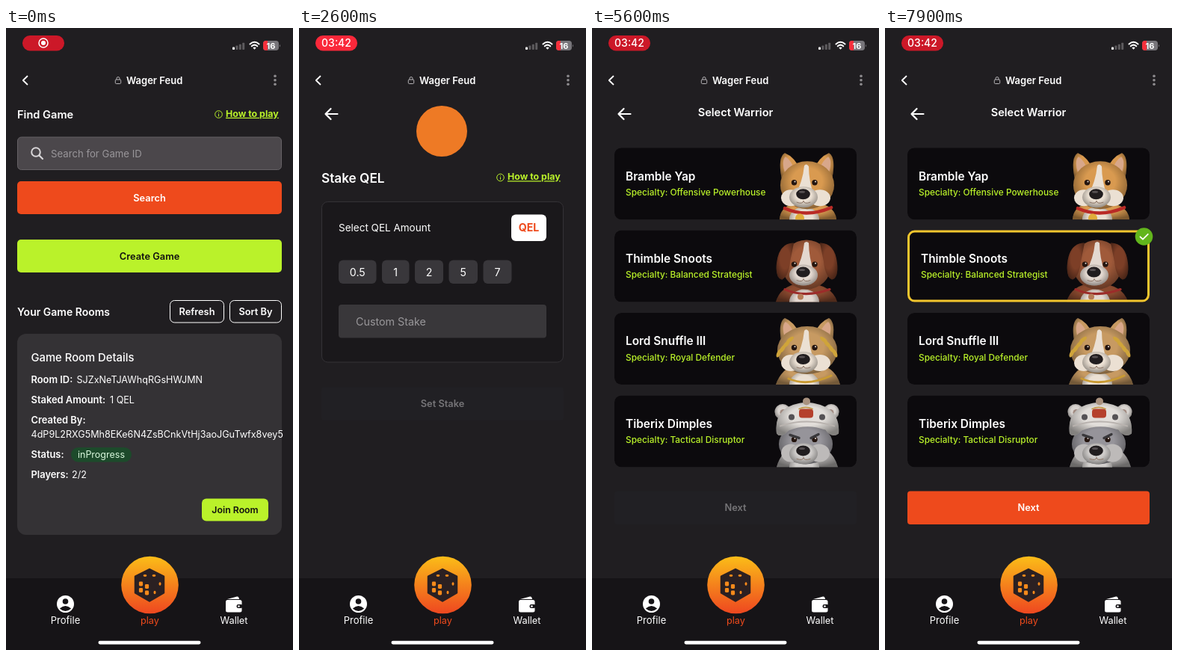
An HTML page that plays this animation: 384x832 px, repeating every 8 s.

```html
<!DOCTYPE html>
<html lang="en">
<head>
<meta charset="utf-8">
<title>Game rooms</title>
<style>
  html, body { margin: 0; width: 100%; height: 100%; overflow: hidden; background: #201e21; }
  svg { display: block; width: 100%; height: 100%; font-family: Inter, Roboto, sans-serif; }
</style>
</head>
<body>
<svg id="stage" viewBox="0 0 384 832"></svg>
<script>
const LOOP = 8000;
const WHITE = '#fff', LIME = '#baf22a', ORANGE = '#ee4a1c', BG = '#201e21';

// Times in ms
const PRESS = 1650, TIMER_IN = 1650, OPEN_STAKE = 2000, PICK_AMOUNT = 3400,
      OPEN_WARRIORS = 4500, IMAGES_READY = 5100, PICK_WARRIOR = 7200, FADE = 250,
      PULSE = 2000, PULSE_PEAK = 2600;

// Markup helpers
const rect = (x, y, w, h, r, fill, extra = '') =>
  `<rect x="${x}" y="${y}" width="${w}" height="${h}" rx="${r}" fill="${fill}" ${extra}/>`;
const circle = (x, y, r, fill, extra = '') =>
  `<circle cx="${x}" cy="${y}" r="${r}" fill="${fill}" ${extra}/>`;
const oval = (x, y, rx, ry, fill, extra = '') =>
  `<ellipse cx="${x}" cy="${y}" rx="${rx}" ry="${ry}" fill="${fill}" ${extra}/>`;
const shape = (d, fill, extra = '') => `<path d="${d}" fill="${fill}" ${extra}/>`;
const line = (d, stroke, width, extra = '') =>
  `<path d="${d}" fill="none" stroke="${stroke}" stroke-width="${width}" stroke-linecap="round" stroke-linejoin="round" ${extra}/>`;
const text = (x, y, size, weight, fill, str, extra = '') =>
  `<text x="${x}" y="${y}" font-size="${size}" font-weight="${weight}" fill="${fill}" ${extra}>${str}</text>`;
const label = (x, y, size, weight, fill, str, extra = '') =>
  text(x, y, size, weight, fill, str, `text-anchor="middle" ${extra}`);
const group = (id, body, extra = '') => `<g id="${id}" ${extra}>${body}</g>`;

const backArrow = line('M51.5 115H35.5M42.5 108L35.5 115L42.5 122', WHITE, 2.2);

const howToPlay = (x, y) =>
  circle(x + 5.5, y - 3.3, 4.8, 'none', `stroke="${LIME}"`) +
  line(`M${x + 5.5} ${y - 3.5}v2.6M${x + 5.5} ${y - 5.6}v.1`, LIME, 1) +
  text(x + 15, y, 12.4, 700, LIME, 'How to play', 'text-decoration="underline"');

function statusBar() {
  const bars = [0, 1, 2, 3].map(i =>
    rect(303 + i * 4.4, 25.5 - i * 1.9, 3, 3.5 + i * 1.9, 0.8, i ? '#5d5b5e' : WHITE)).join('');
  const wifi = line('M326.5 21.5Q332.5 16 338.5 21.5M328.8 24.3Q332.5 21 336.2 24.3', WHITE, 2.1) +
    shape('M330.3 26.4Q332.5 24.8 334.7 26.4L332.5 28.8Z', WHITE);
  const battery = rect(344, 17, 21, 13, 4, '#77757a') +
    shape('M348 17H350V30H348Q344 30 344 26V21Q344 17 348 17Z', '#f5303c') +
    shape('M366 21.5q1.8 2 0 4z', '#77757a') + label(354.5, 27.6, 11, 700, WHITE, '16');
  const record = group('record',
    circle(50, 20, 6, 'none', `stroke="${WHITE}" stroke-width="1.5"`) + circle(50, 20, 3, WHITE));
  return rect(22, 10, 56, 20.5, 10, '#cc1427', 'id="pill"') + record +
    group('timer', label(50, 25.2, 14, 500, WHITE, '03:42')) + bars + wifi + battery;
}

const header = line('M28.5 64.5L22.8 70L28.5 75.5', WHITE, 1.8) +
  rect(146.3, 69, 7.4, 5.5, 1.2, 'none', 'stroke="#b5b3b6"') +
  line('M148 69V67.5a2 2 0 0 1 4 0V69', '#b5b3b6', 1) +
  text(161, 74.6, 13, 600, WHITE, 'Wager Feud') +
  [64.3, 69.8, 75.3].map(y => circle(360, y, 1.8, '#8e8c8f')).join('');

function navBar() {
  const ink = '#2b2022', glow = '#f78a1b';
  const pips = [[180.5, 743.5], [188.5, 747], [180.5, 752], [188.5, 755.5]]
    .map(([x, y]) => rect(x - 2.6, y - 2.9, 5.2, 5.8, 1.4, glow)).join('');
  const dice = shape('M192 724L211 733.5V755.5L192 766.5L173 755.5V733.5Z', ink,
      `stroke="${ink}" stroke-width="2.5" stroke-linejoin="round"`) + pips +
    oval(186, 732.5, 2.4, 1.4, glow) + oval(198, 732.5, 2.4, 1.4, glow) +
    oval(199, 755, 1.5, 2.2, glow) + oval(206, 743.5, 1.5, 2.2, glow);
  const profile = circle(79.5, 770.5, 11.5, WHITE) + circle(79.5, 767, 3.8, '#161417') +
    shape('M71.8 776.5Q79.5 769.5 87.2 776.5Q79.5 783.5 71.8 776.5Z', '#161417');
  const wallet = shape('M296 764L309 760.5Q311.5 760 312 764Z', WHITE) +
    rect(294, 765, 21.5, 16.5, 2.5, WHITE) + rect(308.5, 771, 8, 5, 2.3, '#161417') +
    circle(311.5, 773.5, 1.3, WHITE);
  return rect(0, 736, 384, 96, 0, '#161417') + circle(192.5, 745, 38.3, 'url(#sun)') + dice +
    profile + wallet + label(79.5, 797, 13, 400, WHITE, 'Profile') +
    label(192.5, 797, 12.7, 400, ORANGE, 'play') +
    label(305, 797, 12.8, 400, WHITE, 'Wallet') + rect(123.5, 819.8, 137, 4.6, 2.3, WHITE);
}

function homeScreen() {
  const outlined = (x, w, str) =>
    rect(x + .5, 364.5, w - 1, 29.5, 6, 'none', `stroke="${WHITE}"`) +
    label(x + w / 2, 384, 12.8, 600, WHITE, str);
  const field = (y, name, x = 0, value = '') =>
    text(33.5, y, 12.9, 600, WHITE, name) + (x ? text(x, y, 12.6, 400, WHITE, value) : '');
  return text(15, 121, 14.6, 600, WHITE, 'Find Game') + howToPlay(279, 118.8) +
    rect(15.5, 146, 353, 43.5, 5, '#4b474b', 'stroke="#656165"') +
    circle(40, 166, 5.8, 'none', 'stroke="#d8d6d8" stroke-width="2"') +
    line('M44.5 170.5L49 175', '#d8d6d8', 2.2) +
    text(60, 173, 13.2, 400, '#99969a', 'Search for Game ID') +
    rect(15, 205, 354, 44, 5, ORANGE) + label(192, 231.6, 12.8, 600, WHITE, 'Search') +
    rect(15, 283, 354, 44, 5, LIME, 'id="create"') +
    label(192, 309.7, 12.8, 600, '#111', 'Create Game') +
    text(15, 385, 14, 600, WHITE, 'Your Game Rooms') +
    outlined(219, 73, 'Refresh') + outlined(299, 70, 'Sort By') +
    rect(15, 409, 354, 269, 12, '#343235') +
    text(33.5, 446, 14.8, 500, WHITE, 'Game Room Details') +
    field(475, 'Room ID:', 94.5, 'SJZxNeTJAWhqRGsHWJMN') +
    field(501.8, 'Staked Amount:', 139, '1 QEL') +
    field(528.6, 'Created By:') +
    text(33.5, 548.2, 12.6, 400, WHITE, '4dP9L2RXG5Mh8EKe6N4ZsBCnkVtHj3aoJGuTwfx8vey5') +
    field(575.2, 'Status:') + rect(87, 561, 81, 19.5, 9.7, '#1d4a2b') +
    label(127.5, 575.2, 12.5, 400, '#d8f7dc', 'inProgress') +
    field(602, 'Players:', 88, '2/2') +
    rect(262, 629.5, 89, 30, 6, LIME) + label(306.5, 649.2, 12.3, 600, '#111', 'Join Room');
}

// A button that fades from a dim state to orange
const fadingButton = (id, y, str) =>
  rect(30, y, 324, 44.5, 4, '#212024') + rect(30, y, 324, 44.5, 4, ORANGE, `id="${id}Fill"`) +
  label(192, y + 26.8, 12.8, 600, WHITE, str, `id="${id}Text"`);

function stakeScreen() {
  const chips = [[53, 50.5, '0.5'], [111, 36.5, '1'], [155, 38, '2'], [200.5, 38.5, '5'], [246.5, 38, '7']];
  return backArrow + circle(191, 138, 34, '#ee7a25') +
    text(30, 207, 17.2, 600, WHITE, 'Stake QEL') + howToPlay(264, 203.3) +
    rect(30.5, 232.5, 323, 214.5, 8, '#1a181b', 'stroke="#343236"') +
    text(53, 272, 13.5, 400, WHITE, 'Select QEL Amount') +
    rect(284, 249.5, 47, 35.5, 6, WHITE) + label(307.5, 272.3, 14.2, 700, ORANGE, 'QEL') +
    chips.map(([x, w, str], i) =>
      rect(x, 310.5, w, 31.5, 6, '#39373b', `id="chip${i}"`) +
      label(x + w / 2, 331.8, 14.2, 400, WHITE, str, `id="chipText${i}"`)).join('') +
    rect(53, 370, 278, 44.5, 4, '#39373a') +
    text(76, 397.8, 14.3, 400, '#99979a', 'Custom Stake', 'id="amount"') +
    fadingButton('set', 480.3, 'Set Stake');
}

// Portraits live in a 94 x 96 box
const shaded = (draw, fill) => draw(fill) + draw('url(#shade)');
const mirrored = body => body + `<g transform="translate(${2 * 45.5} 0) scale(-1 1)">${body}</g>`;
const torso = (d, fur, chest) => shaded(fill => shape(d, fill), fur) +
  shaded(fill => oval(42, 96, 20, 17, fill), chest);

const face = (eyeY, noseY, muzzle) =>
  shaded(fill => oval(41, noseY + 4, 19, 14, fill), muzzle) +
  [28.5, 56].map(x => circle(x, eyeY, 3.7, '#24150f') + circle(x + 1, eyeY - 1.3, 1, '#e8dfd8')).join('') +
  oval(40.5, noseY, 9.3, 7, '#211d1f') + oval(39, noseY - 3, 4, 1.5, '#565052') +
  line(`M32 ${noseY + 11}Q40 ${noseY + 14} 41 ${noseY + 9}Q42 ${noseY + 14} 50 ${noseY + 11}`, '#8d7566', 1);

function corgi(fur, regal) {
  const ears = shaded(fill => shape('M12 42Q6 13 16 7Q29 12 37 30Z', fill), fur) +
    shape('M16 33Q11 17 17 12Q25 17 29 30Z', '#d8a78a');
  const cream = '#ebe0d3';
  const leaves = [0, 1, 2, 3].map(i => {
    const x = 8 + i * 5, y = 54 - i * 6;
    return oval(x, y, 2.6, 6, '#cfa43a', `transform="rotate(${25 + i * 9} ${x} ${y})"`);
  }).join('');
  const trim = regal
    ? mirrored(leaves) + line('M21 88Q46 99 78 84', '#c99b33', 3)
    : line('M16 81Q45 94 78 80', '#b92a26', 4.5) + circle(36, 94, 6, '#e0ad3a');
  return mirrored(ears) +
    torso(regal ? 'M4 96Q14 67 45 69Q82 66 90 96Z' : 'M9 96Q10 73 45 72Q83 73 85 96Z', fur, cream) +
    shaded(fill => oval(46, 50, regal ? 40 : 36, 32, fill), fur) +
    oval(24, 67, 13, 11, cream) + oval(63, 67, 14, 11, cream) +
    shape('M42 24Q45 20 48 25Q48 44 55 64L29 66Q40 45 42 24Z', cream) + face(46.5, 62, cream) + trim;
}

function beagle() {
  const cream = '#e3d8d0';
  const ear = shaded(fill => shape('M28 17Q8 17 5 44Q3 64 12 66Q21 62 23 42Z', fill), '#7d3f27');
  return torso('M4 96Q10 72 43 70Q80 73 86 96Z', '#8a4a2f', cream) +
    shaded(fill => oval(45, 46, 33, 33, fill), '#a05a3a') + mirrored(ear) +
    shape('M42 17Q45 14 48 17Q48 36 55 56L29 58Q40 38 42 17Z', cream) +
    face(45.5, 56, cream) + line('M16 79Q43 91 76 79', '#9c2c2a', 3.2) + circle(37, 89, 4, '#b57c56');
}

function husky() {
  const hatEar = shaded(fill => circle(13, 22, 10.5, fill), '#d8d3cf') + circle(14, 23, 4.5, '#a08a80');
  return torso('M5 96Q13 66 46 65Q79 66 87 96Z', '#b9b6b5', '#d2cfcd') +
    shaded(fill => oval(44, 65, 36, 27, fill), '#96949a') + oval(24, 77, 13, 12, '#bdbab9') +
    oval(62, 77, 14, 12, '#bdbab9') + face(59, 74, '#cfccca') +
    line('M23 53L35 57M61 52L51 57', '#39383b', 3.4) + mirrored(hatEar) +
    shaded(fill => shape('M5 51Q0 13 45 9Q91 13 88 51Q79 58 70 46Q45 37 21 47Q10 58 5 51Z', fill), '#e2deda') +
    line('M10 41Q45 29 82 41', '#b9b3af', 2) + circle(45, 8, 5, '#a9927f') +
    rect(35, 18, 19, 12, 4, '#b5402c') + line('M35 18Q44 14 53 18', '#c39a4c', 1.6) +
    mirrored(circle(25, 29, 4, '#555255'));
}

const warriors = [
  ['Bramble Yap', 'Offensive Powerhouse', corgi('#d99a50', false)],
  ['Thimble Snoots', 'Balanced Strategist', beagle()],
  ['Lord Snuffle III', 'Royal Defender', corgi('#c79a62', true)],
  ['Tiberix Dimples', 'Tactical Disruptor', husky()],
];

function warriorScreen() {
  const cards = warriors.map(([name, skill, art], i) => {
    const body = rect(30, 0, 324, 96, 9, '#0c0a0d') +
      group('words' + i, text(45, 43.4, 15.4, 600, WHITE, name) +
        text(45, 63.8, 11.85, 500, LIME, 'Specialty: ' + skill)) +
      `<g class="pending">${rect(242.5, .5, 93, 97, 0, 'none', 'stroke="#858386"')}</g>` +
      group('art' + i, `<g class="ready" transform="translate(242 0)">${art}</g>`);
    return `<g transform="translate(0 ${160.2 + i * 110.4})"><g clip-path="url(#card)">${body}</g></g>`;
  }).join('');
  const chosen = rect(31.5, 272.1, 321, 93, 8, 'none', 'stroke="#f3c62e" stroke-width="3"') +
    circle(346.5, 279, 11.8, '#62b51c') + line('M341.5 279.3L345 282.7L351.8 275.8', WHITE, 1.8);
  return `<g class="pending">${rect(30.5, 101.5, 27, 27, 0, 'none', 'stroke="#858386"')}</g>` +
    `<g class="ready">${backArrow}</g>` + label(192, 118, 14.6, 600, WHITE, 'Select Warrior') +
    cards + group('chosen', chosen) + fadingButton('next', 619.5, 'Next');
}

const stage = document.getElementById('stage');
stage.innerHTML = `<defs>
    <linearGradient id="sun" x2="0" y2="1"><stop stop-color="#fbbd18"/><stop offset="1" stop-color="#ee4720"/></linearGradient>
    <radialGradient id="shade" cy=".42" r=".62"><stop offset=".45" stop-opacity="0"/><stop offset="1" stop-opacity=".42"/></radialGradient>
    <clipPath id="card">${rect(30, 0, 324, 96, 9, WHITE)}</clipPath>
  </defs>` + rect(0, 0, 384, 832, 0, BG) + statusBar() + header +
  group('home', homeScreen()) + group('stake', stakeScreen()) + group('warriors', warriorScreen()) + navBar();

const parts = Object.fromEntries([...stage.querySelectorAll('[id]')].map(el => [el.id, el]));
const pending = stage.querySelectorAll('.pending'), ready = stage.querySelectorAll('.ready');
const set = (id, name, value) => parts[id].setAttribute(name, value);
const show = (el, on) => el.setAttribute('display', on ? 'inline' : 'none');
const progress = (t, start, span) => Math.min(1, Math.max(0, (t - start) / span));
const mix = (a, b, k) => `rgb(${a.map((v, i) => Math.round(v + (b[i] - v) * k))})`;

function updateButton(id, k) {
  set(id + 'Fill', 'opacity', k);
  set(id + 'Text', 'fill', mix([118, 117, 120], [255, 255, 255], k));
}

function update(t) {
  show(parts.home, t < OPEN_STAKE);
  show(parts.stake, t >= OPEN_STAKE && t < OPEN_WARRIORS);
  show(parts.warriors, t >= OPEN_WARRIORS);

  const swap = progress(t, TIMER_IN, 300);
  const pulse = Math.max(0, Math.cos((t - PULSE_PEAK) / PULSE * 2 * Math.PI)) * swap;
  set('pill', 'fill', mix([204, 24, 40], [250, 40, 58], pulse));
  set('record', 'opacity', 1 - swap);
  set('timer', 'opacity', swap);

  set('create', 'fill', mix([186, 242, 42], [152, 197, 40], progress(t, PRESS, 120)));

  const picked = t >= PICK_AMOUNT;
  set('chip0', 'fill', picked ? '#fcc916' : '#39373b');
  set('chipText0', 'fill', picked ? '#171518' : WHITE);
  set('amount', 'fill', picked ? WHITE : '#99979a');
  parts.amount.textContent = picked ? '0.5' : 'Custom Stake';
  updateButton('set', progress(t, PICK_AMOUNT, FADE));

  const loaded = t >= IMAGES_READY, selected = t >= PICK_WARRIOR;
  pending.forEach(el => show(el, !loaded));
  ready.forEach(el => show(el, loaded));
  show(parts.chosen, selected);
  set('words1', 'transform', `translate(${selected ? 3 : 0} 0)`);
  set('art1', 'transform', `translate(${selected ? -3 : 0} 0)`);
  updateButton('next', progress(t, PICK_WARRIOR, FADE));
}

const start = performance.now();
function frame() {
  update((performance.now() - start) % LOOP);
  requestAnimationFrame(frame);
}
frame();
</script>
</body>
</html>
```
